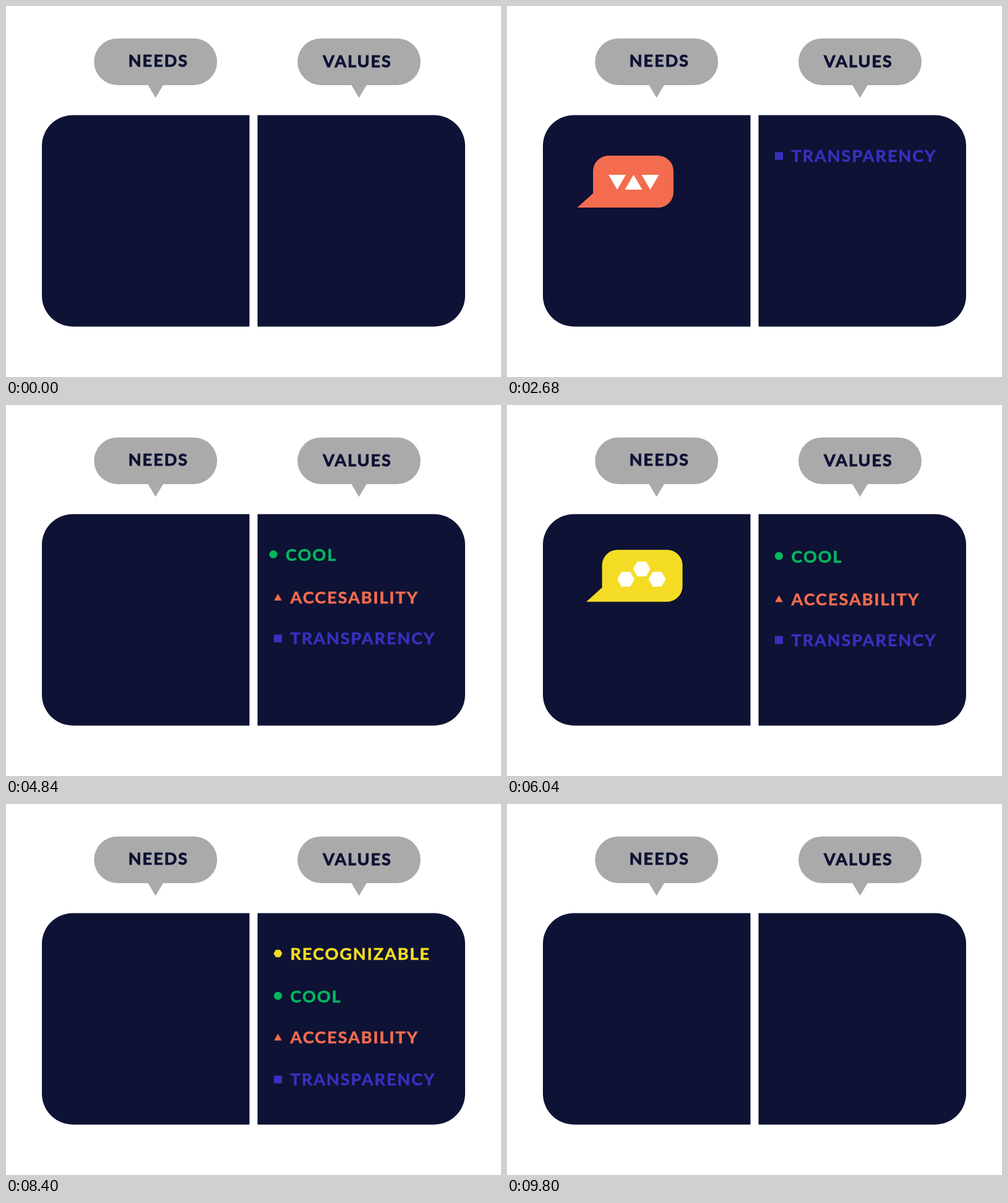
An HTML page that plays this animation: 800 px wide and 600 px high, repeating every 9920 ms.

```html
<!DOCTYPE html>
<html lang="en">
<head>
<meta charset="utf-8">
<title>Needs and values</title>
<style>
  html, body { margin: 0; width: 100%; height: 100%; overflow: hidden; background: #fff; }
  svg { display: block; width: 800px; height: 600px; }
  text { font: 700 27px Lato, "Open Sans", sans-serif; letter-spacing: 2px; stroke-width: 0.6px; }
  .head { fill: #0e1234; stroke: #0e1234; stroke-width: 0.9px; }
  .panel { fill: #0e1234; }
</style>
</head>
<body>
<svg viewBox="0 0 800 600">
  <defs>
    <clipPath id="left"><path d="M393.5 176.4V518.4H108a50 50 0 0 1-50-50V226.4a50 50 0 0 1 50-50Z"/></clipPath>
    <clipPath id="right"><path d="M406.5 176.4V518.4H692a50 50 0 0 0 50-50V226.4a50 50 0 0 0-50-50Z"/></clipPath>
    <path id="label" d="M180 52.5H303.5a37.7 37.7 0 0 1 0 75.4H254L241.7 148.5 229.5 127.9H180a37.7 37.7 0 0 1 0-75.4Z" fill="#aaa"/>
  </defs>
  <use href="#label"/>
  <use href="#label" x="328.8"/>
  <text class="head" x="197.8" y="98.3">NEEDS</text>
  <text class="head" x="512" y="99.3">VALUES</text>
  <g clip-path="url(#left)"><rect class="panel" width="800" height="600"/><g id="needs"></g></g>
  <g clip-path="url(#right)"><rect class="panel" width="800" height="600"/><g id="values"></g></g>
</svg>
<script>
const LOOP = 9920;
const ROWS = [242.5, 311.2, 377.5, 445.5];
const BUBBLE = 'M0 84L25.5 61V25a25 25 0 0 1 25-25H130.5a25 25 0 0 1 25 25V59a25 25 0 0 1-25 25Z';

// Shapes centred on (x, y) with half width w and half height h
const box = (x, y, w, h) => `M${x - w} ${y - h}h${2 * w}v${2 * h}h${-2 * w}Z`;
const tri = (x, y, w, h) => `M${x - w} ${y + h}h${2 * w}L${x} ${y - h}Z`;
const dot = (x, y, r) => `M${x - r} ${y}a${r} ${r} 0 0 1 ${2 * r} 0a${r} ${r} 0 0 1 ${-2 * r} 0Z`;
const hex = (x, y, w, h) =>
  `M${x - w} ${y}L${x - w / 2} ${y - h}h${w}L${x + w} ${y}L${x + w / 2} ${y + h}h${-w}Z`;

// at: moment the bubble is a third of the way up; settle: time from there until its word rests
const items = [
  { word: 'TRANSPARENCY', color: '#3830be', at: 520, settle: 1120,
    icon: box(90.5, 43.7, 44.5, 6.8), bullet: box(0, 0, 6.5, 6.3) },
  { word: 'ACCESABILITY', color: '#f36c4f', at: 2120, settle: 1120,
    icon: tri(64.5, 43, 14, -12) + tri(91, 43, 14, 12) + tri(118, 43, 14, -12), bullet: tri(0, -0.5, 6.3, 5.5) },
  { word: 'COOL', color: '#03b75f', at: 3760, settle: 1120,
    icon: dot(60.7, 42, 10) + dot(89.4, 42, 10) + dot(118, 42, 10), bullet: dot(0, -1, 6.5) },
  { word: 'RECOGNIZABLE', color: '#f4dc24', at: 5360, settle: 1320,
    icon: hex(64, 47.5, 14, 12) + hex(89.5, 31, 14, 12) + hex(114.5, 47.5, 14, 12), bullet: hex(0, -0.5, 7, 6) }
];

// Bubble flight: [time, x, y]
const PATH = [
  [-365, 79, 519], [0, 84.5, 366.2], [360, 99.5, 272], [560, 113.5, 242.2], [640, 123, 235.8],
  [680, 127.8, 234.2], [800, 181, 227], [920, 320.5, 222], [1000, 440, 221]
];

const clamp = v => Math.min(1, Math.max(0, v));
const ramp = (t, from, to) => clamp((t - from) / (to - from));
const ease = p => p < 0.5 ? 2 * p * p : 1 - 2 * (1 - p) ** 2;

function slope(i, k) {
  const a = PATH[Math.max(0, i - 1)], b = PATH[Math.min(PATH.length - 1, i + 1)];
  return (b[k] - a[k]) / (b[0] - a[0]);
}

// Smooth curve through the flight points
function along(t, k) {
  let i = 0;
  while (i < PATH.length - 2 && t > PATH[i + 1][0]) i++;
  const a = PATH[i], b = PATH[i + 1], d = b[0] - a[0], s = clamp((t - a[0]) / d);
  const m = s * s * (3 - 2 * s);
  return a[k] * (1 - m) + b[k] * m
    + d * s * (1 - s) * ((1 - s) * slope(i, k) - s * slope(i + 1, k));
}

function rowY(r) {
  const i = Math.min(2, Math.floor(r));
  return ROWS[i] + (ROWS[i + 1] - ROWS[i]) * (r - i);
}

function add(parent, markup) {
  parent.insertAdjacentHTML('beforeend', markup);
  return parent.lastElementChild;
}

const needs = document.getElementById('needs');
const values = document.getElementById('values');
for (const it of items) {
  it.bubble = add(needs, `<g><path d="${BUBBLE}" fill="${it.color}"/><path d="${it.icon}" fill="#fff"/></g>`);
  it.value = add(values, `<g fill="${it.color}"><path transform="translate(439.5)" d="${it.bullet}"/>
    <text x="459.5" y="9.8" stroke="${it.color}">${it.word}</text></g>`);
}

function place(el, x, y, shown) {
  el.setAttribute('transform', `translate(${x.toFixed(2)} ${y.toFixed(2)})`);
  el.setAttribute('visibility', shown ? 'visible' : 'hidden');
}

function draw(t) {
  items.forEach((it, i) => {
    const u = t - it.at;
    place(it.bubble, along(u, 1), along(u, 2), u > -365 && u < 1000);

    // Each later word pushes this one down a row
    const row = items.slice(i + 1).reduce((sum, next) => sum + ease(ramp(t - next.at, 620, 1060)), 0);
    const leave = 8370 + (3 - i) * 272;
    const out = ramp(t, leave, leave + 615) ** 2;
    const y = rowY(row);
    const x = -290 * (1 - ease(ramp(u, 775, it.settle)));
    place(it.value, x, y + (163 - y) * out, u > 775 && out < 1);
  });
}

const start = performance.now();
function tick() {
  draw((performance.now() - start) % LOOP);
  requestAnimationFrame(tick);
}
tick();
</script>
</body>
</html>
```
